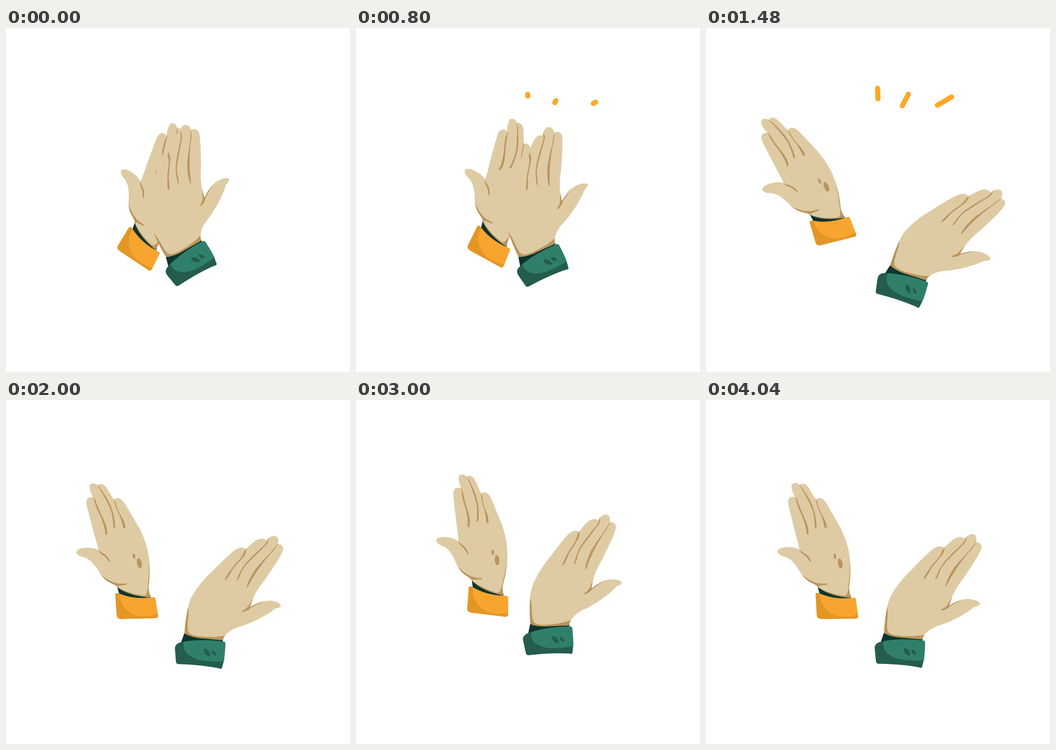
Recreate the animation shown at these times as an HTML page. Size 748x748 px, loop 4080 ms.

```html
<!DOCTYPE html>
<html lang="en">
<head>
<meta charset="utf-8">
<title>Clapping hands</title>
<style>
  html, body { margin: 0; height: 100%; overflow: hidden; background: #fff; }
  svg { display: block; width: 100vw; height: 100vh; }
  .skin { fill: #decba4; }
  .shade { fill: #bb955c; }
  .lining { fill: #0d352e; }
  .orange { fill: #f8a530; }
  .amber { fill: #e29724; }
  .green { fill: #2f7f6b; }
  .pine { fill: #245c4e; }
  #sparks { stroke: #ffa726; stroke-width: 11; stroke-linecap: round; }
</style>
</head>
<body>
<svg viewBox="0 0 748 748">
  <g id="left">
    <path class="lining" d="M245 402L250 424Q285 436 317 431L316 424Z"/>
    <path class="shade" d="M211 374Q219 388 234 395Q244 400 247 405Q272 424 316 429L313 409Q319 378 317 345L300 340Z"/>
    <path class="skin" d="M160 325C158 316 175 313 190 315Q201 316 208 321Q206 308 202 292Q192 248 187 222C185 206 195 202 203 207Q195 193 195 182C196 174 207 173 212 180C220 174 228 179 233 188Q240 201 247 213C254 206 264 210 271 224Q289 257 301 281C312 307 317 330 317 350Q316 380 311 410Q309 425 302 424Q268 419 246 403Q245 399 250 398L240 393Q221 387 211 375C202 358 192 341 176 335Q163 332 160 325Z"/>
    <path class="shade" d="M212 376Q226 387 238 393Q251 397 266 396Q268 398 265 399Q248 400 246 402Q243 396 233 393Q220 387 212 376Z
      M201 205Q206 207 207 214Q213 233 219 247Q229 269 229 280Q229 288 226 289Q224 288 224 276Q221 260 215 245Q204 221 204 209Z
      M211 179Q216 182 222 193Q237 216 242 235Q247 254 247 271Q246 276 243 274Q243 250 239 235Q229 209 219 192Q215 184 211 179Z
      M246 212Q250 216 251 225Q256 242 263 253Q269 266 269 274Q267 278 264 274Q262 259 257 246Q250 232 246 212Z
      M208 320Q211 325 219 329Q227 334 232 345Q233 349 230 347Q222 334 214 330Q209 326 208 320Z"/>
    <ellipse class="shade" cx="295.500" cy="353.500" rx="5" ry="11" transform="rotate(-9 295.500 353.500)"/>
    <ellipse class="shade" cx="284.500" cy="337.500" rx="2.800" ry="6" transform="rotate(-8 284.500 337.500)"/>
    <path class="amber" d="M240 420Q240 415 246 416Q278 433 323 429Q327 429 327 433L331 469Q331 474 326 474.500L252 473Q242 473 241 465Z"/>
    <path class="orange" d="M249 417.500Q282 433 323 429Q327 429 327 433L330.500 465Q306 473 285 467C262 460 249 440 249 417.500Z"/>
  </g>
  <g id="right">
    <path class="lining" d="M385 501L378 524L420 528L467 520L470 511Z"/>
    <path class="shade" d="M392 438Q386 462 385 502Q402 511 430 511L468 513L474 501L440 480Z"/>
    <path class="skin" d="M391 445C391 432 399 416 407 404Q421 382 440 363Q459 342 476 325Q491 309 502 309.500Q507 310 510 313Q521 300 532 292Q547 284 553 292Q564 279 573 281Q582 285 579 298Q592 299 591 310C589 322 568 355 555 376Q537 401 530 420L525 438Q548 422 568 422Q590 424 592 432Q589 437 579 439Q569 449 545 463Q522 476 498 484Q482 491 474 502Q454 508 425 507Q400 507 394 499C388 488 394 466 391 445Z"/>
    <path class="shade" d="M512 311Q511 318 508 326Q494 344 483 358Q476 374 469 382Q466 382 469 376Q479 359 487 348Q504 330 507 316Z
      M558 286Q559 294 554 301Q542 314 526 331Q510 347 503 361Q498 378 494 382Q491 382 495 375Q500 358 512 342Q529 322 548 304Q554 298 558 286Z
      M580 296Q572 308 563 319Q545 339 533 355Q519 377 515.500 394Q516 398 519 392Q526 376 536 360Q548 340 563.500 321Q575 309 580 296Z
      M531 417Q528 424 524 431Q518 443 508 447Q507 449 511 449Q522 445 527 439Q541 431 555 423Q537 430 525 438Q528 426 531 417Z"/>
    <path class="pine" d="M366 536Q365 526 376 522Q414 511 471 515.500Q475 516 475 521Q476 552 470 574Q468 576 463 574Q425 568 374 569Q370 568 369.500 564Z"/>
    <path class="green" d="M385 519.500Q425 511.500 471 515.500Q475 516 475 521L474 558.500Q440 562 417 557C392 550 382 538 385 519.500Z"/>
    <path class="pine" d="M429 534C433 530 443 537 443.500 549C436 550 429 543 429 534ZM446 537C450 534 456 540 456 547C451 548 446 543 446 537Z"/>
  </g>
  <g id="sparks"><line/><line/><line/></g>
</svg>
<script>
const LOOP = 4080, FRAME = 40, DRAWN_ANGLE = 32.4;
const BEAT = 426;
const left = document.getElementById('left');
const right = document.getElementById('right');
const sparks = document.querySelectorAll('#sparks line');

// centre, then half the full extent
const rays = [[373.5, 142.5, .5, 11.5], [433.5, 156.5, 6.5, -12.5], [518.5, 159, 15.5, -9]];

// time, opening angle, vertical offset
const keys = [];
for (let i = 0; i < 3; i++) {
  keys.push([i * BEAT, 0, 0], [(i + .5) * BEAT, 34.6, 4.5]);
}
keys.push([3 * BEAT, 0, 0], [1500, 48.6, 5.5], [1765, 35.4, 4.5], [2300, 34.6, 4.5],
  [2665, 34.5, 4.5], [2860, 23, -20], [3310, 40.4, 13.5], [3900, 34.3, 4], [LOOP, 34.2, 4]);

const mix = (a, b, u) => a + (b - a) * u;

function pose(t) {
  const i = keys.findIndex(k => k[0] > t);
  const a = keys[i - 1], b = keys[i];
  const u = (1 - Math.cos(Math.PI * (t - a[0]) / (b[0] - a[0]))) / 2;
  return [mix(a[1], b[1], u), mix(a[2], b[2], u)];
}

function sparkSize(t) {
  const start = 354;
  if (t < start || t >= start + 3 * BEAT) return 0;
  const p = (t - start) % BEAT;
  return Math.max(0, Math.min(1, p / 115, (400 - p) / 80));
}

function draw(t) {
  const [angle, dy] = pose(t);
  const turn = angle - DRAWN_ANGLE;
  left.setAttribute('transform', `translate(0 ${dy}) rotate(${-turn} 228 473)`);
  right.setAttribute('transform', `translate(0 ${dy}) rotate(${turn} 360 564)`);

  const size = sparkSize(t);
  const drop = 4.5 * (1 - size);
  sparks.forEach((line, i) => {
    const [x, y, w, h] = rays[i];
    line.setAttribute('x1', x - w * size);
    line.setAttribute('y1', y - h * size + drop);
    line.setAttribute('x2', x + w * size);
    line.setAttribute('y2', y + h * size + drop);
    line.setAttribute('visibility', size ? 'visible' : 'hidden');
  });
}

const begin = performance.now();
function tick() {
  const t = (performance.now() - begin) % LOOP;
  draw(Math.floor(t / FRAME) * FRAME);
  requestAnimationFrame(tick);
}
tick();
</script>
</body>
</html>
```
